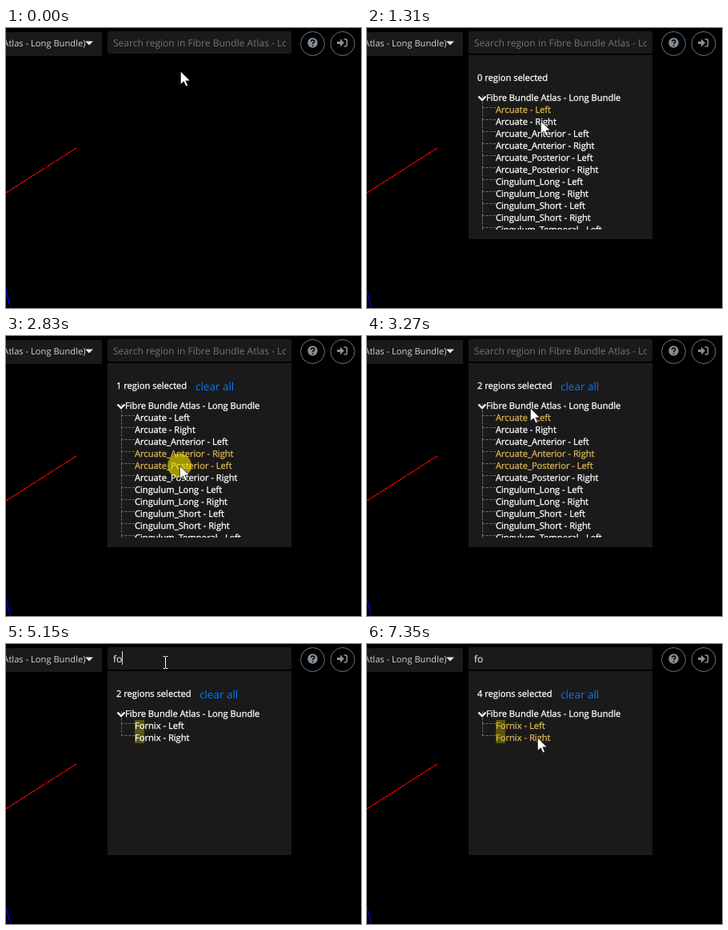
These frames come from a looping animation (444x350 px, 7.5 s). An HTML page:

```html
<!DOCTYPE html>
<html lang="en">
<head>
<meta charset="utf-8">
<title>Region search</title>
<style>
  html, body { margin: 0; width: 100%; height: 100%; overflow: hidden; background: #000; }
  body { position: relative; color: #fff; font: 11.15px/15px "Open Sans", "Noto Sans", sans-serif; text-rendering: geometricPrecision; }
  div, svg { position: absolute; white-space: pre; }
  .box { background: #1a1a1a; overflow: hidden; }
  #atlas { left: 0; top: 5px; width: 120px; height: 30px; }
  #atlas div { right: 20.5px; top: 7px; color: #d0d2d4; }
  #input { left: 127px; top: 4px; width: 230px; height: 28px; border-radius: 3px; }
  #query { left: 7px; top: 6px; width: 216px; height: 18px; overflow: hidden; font-size: 12.05px; line-height: 18px; }
  #caret { top: 9px; width: 1px; height: 17px; background: #ddd; }
  #panel { left: 127px; top: 34px; width: 230px; height: 230px; }
  #count, #list { left: 11px; -webkit-text-stroke: .3px currentColor; }
  #count { top: 21px; }
  #clear { top: 20px; font-size: 13.5px; line-height: 18px; color: #007bff; }
  #list { top: 46px; width: 208px; overflow: hidden; }
  #list > div { left: 23px; }
  #list > .title { left: 11px; top: 0; }
  .row::before { content: ""; position: absolute; left: -17px; top: -11px; width: 16px; height: 15px; border: dashed #6a6a6a; border-width: 0 0 1px 1px; }
  mark { color: inherit; background: #59560f; }
  .on { color: #dbb556; }
  svg { left: 0; top: 0; }
</style>
</head>
<body>
<div id="atlas" class="box"><div>Fibre Bundle Atlas - Long Bundle)</div></div>
<div id="input" class="box"><div id="query"></div></div>
<div id="panel" class="box">
  <div id="count"></div>
  <div id="clear">clear all</div>
  <div id="list"></div>
</div>
<div id="caret"></div>
<svg width="444" height="350" fill="none">
  <path d="M99 16.5h10l-5 5z" fill="#e4e4e4"/>
  <g shape-rendering="crispEdges">
    <path d="M0 206L88.500 149.700" stroke="#f00"/>
    <path d="M0 329L5.500 350" stroke="#00f"/>
  </g>
  <g stroke="#6c757d">
    <circle cx="383.500" cy="19.500" r="15"/>
    <circle cx="421" cy="19.500" r="15"/>
  </g>
  <circle cx="383.500" cy="18.500" r="6.200" fill="#868e96"/>
  <path d="M381.600 17c0-2.600 4-2.600 4 0c0 1.500-2 1.400-2 3M383.600 21.200v1.600" stroke="#000" stroke-width="1.600"/>
  <path d="M414 17h4v-3.500l5 5-5 5V20h-4z" fill="#868e96"/>
  <path d="M422.500 14h2.500q1.300 0 1.300 1.300v6.400q0 1.300-1.300 1.300h-2.500" stroke="#868e96" stroke-width="1.700"/>
  <path id="chevron" d="M139.500 85.500l4.500 4.500 4.500-4.500" stroke="#fff" stroke-width="2.400"/>
  <g id="pointer">
    <circle id="halo" r="15" fill="#fff300" fill-opacity=".58"/>
    <path id="arrow" d="M.3 0V16.500L4.300 13l2.700 6 2.500-1.200L6.900 12h5.400z" fill="#fff" stroke="#000" stroke-width=".7"/>
    <path id="beam" d="M-.5 -6.500H2m1 0h2.500M2.500 -6V8M-.5 8.500H2m1 0h2.500" stroke="#fff"/>
  </g>
</svg>
<script>
const LOOP = 7500;
const $ = id => document.getElementById(id);

const bundles = ['Arcuate', 'Arcuate_Anterior', 'Arcuate_Posterior', 'Cingulum_Long', 'Cingulum_Short',
  'Cingulum_Temporal', 'CorticoSpinalTract', 'Fornix', 'Inferior_Longitudinal'];
const regions = bundles.flatMap(b => [b + ' - Left', b + ' - Right']);
const picks = ['Arcuate_Anterior - Right', 'Arcuate_Posterior - Left', 'Fornix - Left', 'Fornix - Right'];

// Pointer moves: start, end, steps, x, y
const moves = [
  [230, 450, 4, 228, 21],
  [930, 1540, 8, 214, 141],
  [2110, 2110, 1, 216, 146],
  [2180, 2500, 5, 217, 162],
  [3130, 3270, 3, 204, 90],
  [3360, 3590, 4, 197, 22],
  [5790, 6030, 4, 217, 104],
  [6170, 6170, 1, 217, 105],
  [6570, 6720, 3, 213, 117]
];
const clicks = [[530, 690], [1790, 1940], [2830, 2890], [3830, 3990], [6320, 6400], [6870, 7100]];
const blinks = [[610, 1140], [1710, 1790], [3830, 4370], [4600, 5470], [6030, 6320]];
const counts = [[0, 0], [2180, 1], [3130, 2], [6570, 3], [7350, 4]];
const typed = [[0, ''], [4600, 'f'], [4920, 'fo']];
const filters = [[0, ''], [4860, 'f'], [5150, 'fo']];

const within = (spans, t) => spans.some(([a, b]) => t >= a && t < b);
const at = (steps, t) => steps.filter(s => s[0] <= t).pop()[1];
const show = (id, on) => { $(id).style.display = on ? '' : 'none'; };

const path = [{ t: 0, x: 218, y: 54 }];
for (const [a, b, n, x, y] of moves) {
  const from = path[path.length - 1];
  for (let k = 1; k <= n; k++) {
    const f = 1 - (1 - k / n) ** 1.6;
    path.push({
      t: n > 1 ? a + (b - a) * (k - 1) / (n - 1) : a,
      x: Math.round(from.x + (x - from.x) * f),
      y: Math.round(from.y + (y - from.y) * f)
    });
  }
}

let shown = null;
function fillList(key) {
  if (key === shown) return;
  shown = key;
  const hits = regions.filter(r => r.toLowerCase().includes(key));
  const label = r => key ? r.replace(new RegExp(key, 'gi'), '<mark>$&</mark>') : r;
  $('list').innerHTML = '<div class="title">Fibre Bundle Atlas - Long Bundle</div>' +
    hits.map((r, i) => `<div class="row" data-name="${r}" style="top:${15 + 15 * i}px">${label(r)}</div>`).join('');
  $('list').style.height = Math.min(172, 14 + 15 * hits.length) + 'px';
}

function draw(t) {
  let i = path.length - 1;
  while (path[i].t > t) i--;
  const p = path[i];
  // Hover reacts one step late
  const h = i && t - p.t < 95 ? path[i - 1] : p;
  const open = t >= 610;
  const beam = p.y < 32;
  $('pointer').setAttribute('transform', `translate(${p.x} ${p.y})`);
  show('halo', within(clicks, t));
  show('beam', beam);
  show('arrow', !beam);

  const text = at(typed, t);
  $('query').textContent = text || 'Search region in Fibre Bundle Atlas - Long Bundle';
  $('query').style.color = text ? '#fff' : '#6c757d';
  show('caret', within(blinks, t));
  $('caret').style.left = [134, 138, 145][text.length] + 'px';

  show('panel', open);
  show('chevron', open);
  const n = at(counts, t);
  $('count').textContent = `${n} region${n > 1 ? 's' : ''} selected`;
  show('clear', n > 0);
  $('clear').style.left = (n > 1 ? 115 : 110) + 'px';

  fillList(at(filters, t));
  const over = Math.floor((h.y - 80) / 15);
  const chosen = picks.slice(0, n);
  [...$('list').children].forEach((row, k) =>
    row.classList.toggle('on', k === over || chosen.includes(row.dataset.name)));
}

function tick() {
  draw(performance.now() % LOOP);
  requestAnimationFrame(tick);
}
tick();
</script>
</body>
</html>
```
